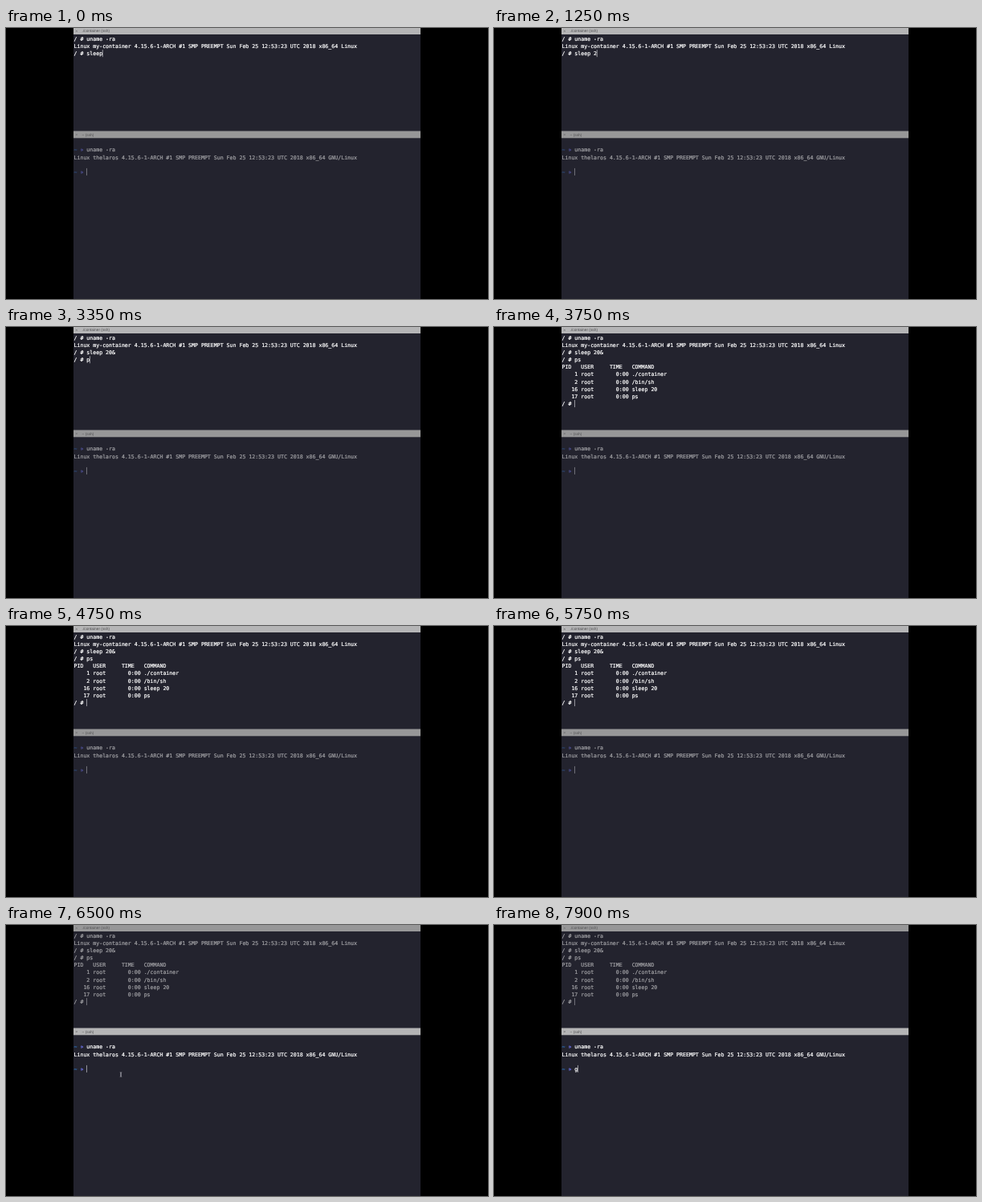
An HTML page that plays this animation: 600x338 px, repeating every 8000 ms.

```html
<!DOCTYPE html>
<html lang="en">
<head>
<meta charset="utf-8">
<title>Terminal session</title>
<style>
  html, body { margin: 0; width: 100%; height: 100%; overflow: hidden; background: #000; }
  svg { display: block; width: 100vw; height: 100vh; }
  text { white-space: pre; text-rendering: geometricPrecision; fill: currentColor; }
  .row { font: 6.59px "DejaVu Sans Mono", monospace; color: #9e9ea2; }
  .row, .row tspan { fill: currentColor; stroke: currentColor; stroke-width: .22; }
  .title { font: 4.8px "Liberation Sans", Arial, sans-serif; color: #505052; }
  .bar { fill: #979798; }
  .close { stroke: #6c6c6e; stroke-width: .6; fill: none; }
  .caret { fill: #7c7c84; }
  .path { color: #2f4f80; }
  .mark { color: #4f5298; }
  .focus .row { color: #fff; }
  .focus .title { color: #4c4c4e; }
  .focus .bar { fill: #b5b5b6; }
  .focus .caret { fill: #a6a6ac; }
  .focus .path { color: #2f78c4; }
  .focus .mark { color: #7076ee; }
</style>
</head>
<body>
<svg id="stage" viewBox="0 0 600 338">
  <rect width="600" height="338" fill="#000"/>
  <rect x="84" width="432" height="338" fill="#23232e"/>
  <path id="mouse" d="M-1.2-2.8Q0-2.8 0-2V2Q0 2.8-1.2 2.8M1.2-2.8Q0-2.8 0-2V2Q0 2.8 1.2 2.8"
    fill="none" stroke="#b4b4ba" stroke-width=".7"/>
</svg>
<script>
const LOOP = 8000, LEFT = 84.5, COL = 3.967, LINE = 9.13;
const FOCUS_AT = 6500, MOVE_AT = 5950, REST_AT = 6400, KEY_AT = 7900;
const stage = document.getElementById('stage');
const mouse = document.getElementById('mouse');

function add(parent, tag, attrs, content = '') {
  const el = document.createElementNS('http://www.w3.org/2000/svg', tag);
  for (const key in attrs) el.setAttribute(key, attrs[key]);
  el.textContent = content;
  parent.append(el);
  return el;
}

function makePane(barY, base, title, count) {
  const g = add(stage, 'g', {});
  add(g, 'rect', { class: 'bar', x: 84, y: barY, width: 432, height: 8.8 });
  add(g, 'path', { class: 'close', d: `M86.8 ${barY + 3.6}l2 2m0-2l-2 2` });
  add(g, 'text', { class: 'title', x: 94.6, y: barY + 6.2 }, title);
  const rows = Array.from({ length: count }, (_, i) =>
    add(g, 'text', { class: 'row', x: LEFT, y: base + i * LINE }));
  const caret = add(g, 'rect', { class: 'caret', width: .9, height: 9 });
  return { g, rows, caret, base };
}

function setCaret(pane, row, col) {
  pane.caret.setAttribute('x', LEFT + col * COL - .4);
  pane.caret.setAttribute('y', pane.base + row * LINE - 6.9);
}

const upper = makePane(-.8, 15.8, './container (ssh)', 10);
const lower = makePane(128.5, 154.4, '~ (ssh)', 4);
stage.append(mouse);

const kernel = '4.15.6-1-ARCH #1 SMP PREEMPT Sun Feb 25 12:53:23 UTC 2018 x86_64';
const header = ['/ # uname -ra', `Linux my-container ${kernel} Linux`];
const table = [
  'PID   USER     TIME   COMMAND',
  '    1 root       0:00 ./container',
  '    2 root       0:00 /bin/sh',
  '   16 root       0:00 sleep 20',
  '   17 root       0:00 ps'
];

// [time, typed text]; '\n' ends a command
const keys = [
  [0, 'sleep'], [200, ' '], [1250, '2'], [1400, '0'], [2150, '&'],
  [2700, '\n'], [3350, 'p'], [3550, 's'], [3750, '\n']
];

function prompt(row) {
  add(row, 'tspan', { class: 'path' }, '~');
  add(row, 'tspan', { class: 'mark' }, ' » ');
  return add(row, 'tspan', {});
}
prompt(lower.rows[0]).textContent = 'uname -ra';
lower.rows[1].textContent = `Linux thelaros ${kernel} GNU/Linux`;
const input = prompt(lower.rows[3]);

const setText = (el, s) => { if (el.textContent !== s) el.textContent = s; };

function draw(t) {
  const typed = keys.filter(k => k[0] <= t).map(k => k[1]).join('').split('\n');
  const lines = [...header, ...typed.map(s => '/ # ' + s)];
  if (typed.length > 2) lines.splice(4, 0, ...table);
  upper.rows.forEach((row, i) => setText(row, lines[i] || ''));
  setCaret(upper, lines.length - 1, lines[lines.length - 1].length);

  const reply = t >= KEY_AT ? 'g' : '';
  setText(input, reply);
  setCaret(lower, 3, 4 + reply.length);

  upper.g.classList.toggle('focus', t < FOCUS_AT);
  lower.g.classList.toggle('focus', t >= FOCUS_AT);

  const p = Math.min(1, Math.max(0, (t - MOVE_AT) / (REST_AT - MOVE_AT)));
  const e = p * p * (3 - 2 * p);
  mouse.setAttribute('transform', `translate(${172 - 29 * e} ${96 + 90.5 * e})`);
  mouse.style.display = t >= MOVE_AT && t < KEY_AT ? '' : 'none';
}

const start = performance.now();
function tick() {
  draw((performance.now() - start) % LOOP);
  requestAnimationFrame(tick);
}
draw(0);
requestAnimationFrame(tick);
</script>
</body>
</html>
```
